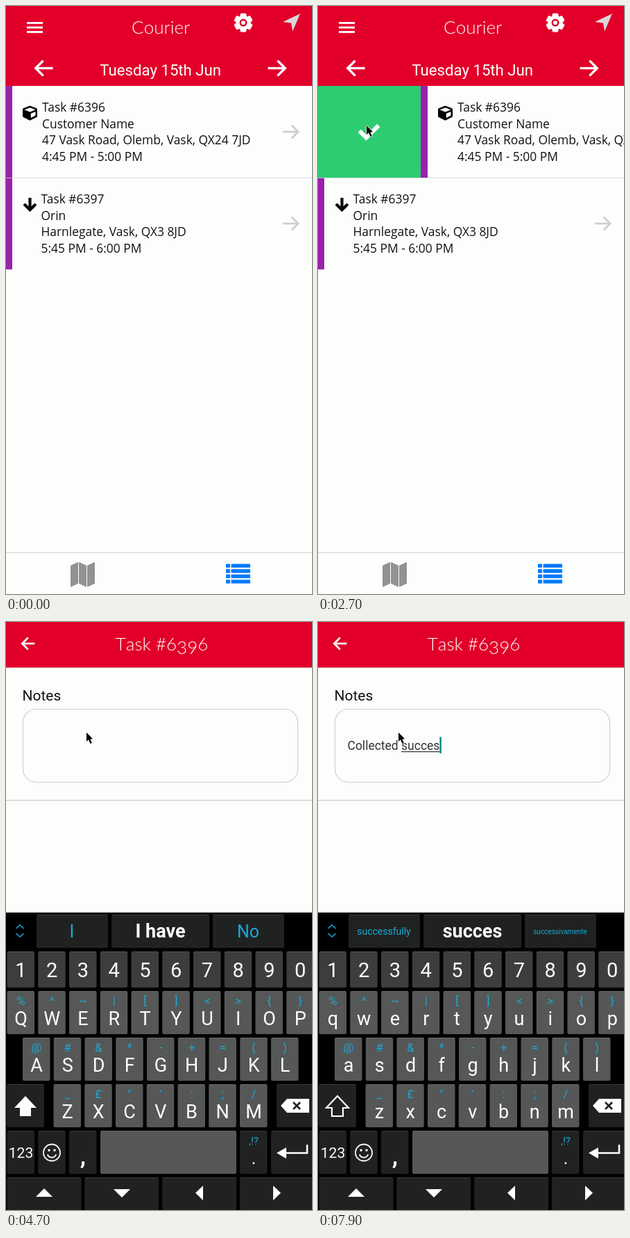
An HTML page with a canvas for the animation above (8000 ms loop, 441 by 846 pixels).

```html
<!DOCTYPE html>
<html lang="en">
<head>
<meta charset="utf-8">
<title>Courier tasks</title>
<style>
html, body { margin: 0; width: 100%; height: 100%; overflow: hidden; background: #fcfefc; }
canvas { display: block; }
</style>
</head>
<body>
<canvas id="stage" width="441" height="846"></canvas>
<script>
const W = 441, H = 846, LOOP = 8000, STEP = 100;
const RED = '#e2002a', PAPER = '#fcfefc', GREEN = '#2ecc71', BLUE = '#0d74d6', HINT = '#1ba8d8';
const ROBOTO = 'Roboto, sans-serif', OPEN = '"Open Sans", sans-serif', LATO = 'Lato, sans-serif';
const stage = document.getElementById('stage').getContext('2d');
const layer = new OffscreenCanvas(W, H).getContext('2d');
let c = stage;

// ---------- drawing helpers ----------
function rect(x, y, w, h, color) {
  c.fillStyle = color;
  c.fillRect(x, y, w, h);
}

function trace(pts) {
  c.beginPath();
  for (let i = 0; i < pts.length; i += 2) c.lineTo(pts[i], pts[i + 1]);
}

function poly(pts, color) {
  trace(pts);
  c.closePath();
  c.fillStyle = color;
  c.fill();
}

function line(pts, color, width) {
  trace(pts);
  c.strokeStyle = color;
  c.lineWidth = width;
  c.stroke();
}

function ring(x, y, r, color, width) {
  c.beginPath();
  c.arc(x, y, r, 0, 7);
  c.strokeStyle = color;
  c.lineWidth = width;
  c.stroke();
}

function disc(x, y, r, color) {
  c.beginPath();
  c.arc(x, y, r, 0, 7);
  c.fillStyle = color;
  c.fill();
}

function text(str, x, y, font, color, align = 'left') {
  c.font = font;
  c.fillStyle = color;
  c.textAlign = align;
  c.fillText(str, x, y);
}

function shifted(x, y, draw) {
  c.save();
  c.translate(x, y);
  draw();
  c.restore();
}

// Arrow centred on x, y; dir 1 points right, -1 left.
function arrow(x, y, half, head, dir, color, width) {
  const tip = x + dir * (half - width * 0.7);
  line([x - dir * half, y, tip, y], color, width);
  line([tip - dir * head, y - head, tip, y, tip - dir * head, y + head], color, width);
}

function check(x, y) {
  line([x - 13.8, y - 2.4, x - 3.9, y + 7.5, x + 13.8, y - 10.2], '#fff', 6);
}

// Titles use hanging figures: 3 and 9 sit below the baseline.
function title(str, y) {
  const font = '300 26px ' + LATO;
  c.font = font;
  let x = 223 - c.measureText(str).width / 2;
  for (const ch of str) {
    text(ch, x, y + ('39'.includes(ch) ? 5 : 0), font, '#fff');
    x += c.measureText(ch).width;
  }
}

// Piecewise linear track of [time, ...values].
function track(keys, t) {
  const n = keys.findIndex(k => k[0] > t);
  if (n < 0) return keys[keys.length - 1].slice(1);
  if (n === 0) return keys[0].slice(1);
  const a = keys[n - 1], b = keys[n], p = (t - a[0]) / (b[0] - a[0]);
  return a.slice(1).map((v, i) => v + (b[i + 1] - v) * p);
}

// ---------- task list ----------
function gear(x, y) {
  shifted(x, y, () => {
    disc(0, 0, 10.5, '#fff');
    for (let i = 0; i < 3; i++) {
      c.beginPath();
      c.roundRect(-4.5, -13.5, 9, 27, 2);
      c.fill();
      c.rotate(Math.PI / 3);
    }
    ring(0, 0, 4.3, RED, 2.4);
  });
}

function cube(x, y) {
  poly([x, y - 10.5, x + 9.8, y - 6.8, x + 10.5, y - 5.5, x + 10.5, y + 5, x + 9.5, y + 6,
    x, y + 10.7, x - 9.5, y + 6, x - 10.5, y + 5, x - 10.5, y - 5.5, x - 9.8, y - 6.8], '#000');
  poly([x, y - 7.8, x + 8, y - 4.8, x, y - 1.5, x - 8, y - 4.8], PAPER);
  poly([x + 1.3, y + 0.8, x + 8, y - 1.9, x + 8, y + 3.6, x + 1.3, y + 7], PAPER);
}

function downArrow(x, y) {
  line([x, y - 10, x, y + 6], '#000', 4.2);
  line([x - 8.4, y - 1, x, y + 7.3, x + 8.4, y - 1], '#000', 4.2);
}

function task(y, x, lines, icon) {
  rect(0, y, W, 132, PAPER);
  rect(-1, y, 10, 132, '#9a20ad');
  icon(34.5, y + 39);
  lines.forEach((s, i) => text(s, x, y + 37 + i * 23.6, '17.4px ' + OPEN, '#111'));
  arrow(411, y + 66, 12, 9.5, 1, '#cccecc', 2.8);
}

function listPage(offset, pressed) {
  rect(0, 0, W, H, PAPER);
  rect(0, 0, W, 115, RED);
  for (let i = 0; i < 3; i++) rect(30, 23 + i * 6.5, 23, 2.8, '#fff');
  title('Courier', 40);
  gear(342, 24);
  poly([424, 11, 413, 36.5, 411, 24.5, 399, 23], '#d9d7d9');
  arrow(54, 89.5, 13.5, 10.8, -1, '#fff', 3.3);
  arrow(391, 89.5, 13.5, 10.8, 1, '#fff', 3.3);
  text('Tuesday 15th Jun', 222.7, 100, '22.2px ' + ROBOTO, '#fff', 'center');

  c.globalAlpha = pressed ? 0.6 : 1;
  rect(0, 115, offset, 132, GREEN);
  if (offset > 58) check(73.5, 182);
  c.globalAlpha = 1;
  shifted(offset, 0, () => task(115, 52,
    ['Task #6396', 'Customer Name', '47 Vask Road, Olemb, Vask, QX24 7JD', '4:45 PM - 5:00 PM'], cube));
  task(247, 50.5, ['Task #6397', 'Orin', 'Harnlegate, Vask, QX3 8JD', '5:45 PM - 6:00 PM'], downArrow);
  rect(0, 247, W, 1, 'rgba(215,215,215,.75)');

  rect(0, 786, W, 1, '#d2d4d2');
  for (let i = 0; i < 3; i++) {
    const x = 93 + i * 12, a = i % 2 ? 800 : 805, b = 1605 - a;
    poly([x, a, x + 11, b, x + 11, b + 31, x, a + 31], '#929292');
  }
  for (let i = 0; i < 4; i++) {
    rect(317, 802.7 + i * 7.6, 6, 5.3, '#007aff');
    rect(324.5, 802.7 + i * 7.6, 27.5, 5.3, '#007aff');
  }
}

// ---------- task form ----------
function signature() {
  c.beginPath();
  c.moveTo(67, 711);
  c.bezierCurveTo(74, 707, 85, 704, 82, 713);
  c.bezierCurveTo(79, 722, 73, 728, 70, 732);
  c.bezierCurveTo(76, 722, 86, 709, 92, 711);
  c.bezierCurveTo(97, 714, 83, 728, 88, 729);
  c.bezierCurveTo(93, 729, 95, 717, 98, 720);
  c.bezierCurveTo(100, 724, 103, 719, 109, 719);
  c.strokeStyle = BLUE;
  c.lineWidth = 3.8;
  c.lineJoin = 'round';
  c.stroke();
  c.lineJoin = 'miter';
}

function camera() {
  c.beginPath();
  c.roundRect(345, 709, 34, 26, 3);
  c.fillStyle = BLUE;
  c.fill();
  poly([353, 710, 356, 704.5, 368, 704.5, 371, 710], BLUE);
  ring(362, 721.5, 7, '#fff', 2.6);
}

function formPage() {
  rect(-1, 0, 1, H, '#e6e8e6');
  rect(0, 0, W, H, PAPER);
  rect(0, 0, W, 65.5, RED);
  rect(0, 65.5, W, 1.5, 'rgba(0,0,0,.08)');
  arrow(31.5, 31, 10, 8.5, -1, '#fff', 2.6);
  title('Task #6396', 40.5);
  text('Notes', 23.5, 112.5, '21px ' + ROBOTO, '#111');
  c.beginPath();
  c.roundRect(24.5, 125.5, 396, 105, 19);
  c.strokeStyle = '#cdcfcd';
  c.lineWidth = 1.2;
  c.stroke();
  rect(0, 256, W, 1.2, '#c9cbc9');
  rect(0, 660, W, 1, '#cdcfcd');
  signature();
  text('Add a proof of delivery', 122, 727, '19.8px ' + OPEN, BLUE);
  camera();
  rect(0, 778, W, 68, GREEN);
  check(179, 813);
  text('Validate', 209, 820.5, '19.8px ' + OPEN, '#fff');
}

// ---------- typing ----------
const NOTE = 'Collected succes';
// time, letters typed, suggestions
const TYPING = [
  [0, 0, 'I', 'I have', 'No'],
  [5300, 1, 'Come', 'C', 'Ciao'],
  [5400, 2, 'Come', 'Co', 'Con'],
  [5500, 3, 'Cold', 'Col', 'Colore'],
  [5600, 4, 'Collaborazione', 'Coll', 'Colloquio'],
  [5800, 5, 'College', 'Colle', 'Collega'],
  [5900, 6, 'Collect', 'Collec', 'Collection'],
  [6000, 7, 'Collection', 'Collected', 'Collect'],
  [6200, 8, 'Collecte', 'Collected', 'Collect'],
  [6600, 9, 'Collect', 'Collected', 'Collector'],
  [6900, 10, 'and', 'from', 'the'],
  [7200, 11, 'so', 's', 'still'],
  [7400, 12, 'sul', 'su', 'such'],
  [7600, 13, 'such', 'suc', 'success'],
  [7700, 14, 'success', 'succ', 'successo'],
  [7800, 15, 'success', 'succe', 'successo'],
  [7900, 16, 'successfully', 'succes', 'successivamente']
];

function note(count, caret) {
  const x = 42.5, typed = NOTE.slice(0, count);
  text(typed, x, 184, '17.5px ' + ROBOTO, '#333');
  const end = x + c.measureText(typed).width;
  const start = x + c.measureText(typed.slice(0, typed.lastIndexOf(' ') + 1)).width;
  rect(start, 186, end - start, 1.2, '#333');
  if (caret) rect(end, 165.5, 2.5, 23.5, '#0c8a80');
}

// ---------- keyboard ----------
const PITCH = 44.75, DARK = '#202221', MID = '#3b3e3d', LIGHT = '#555857';
const ROWS = [
  ['qwertyuiop', '%^~|[]<>{}', 1.5, 531],
  ['asdfghjkl', '@#&*-+=()', 24, 598],
  ['zxcvbnm', '_£"\':;/', 68.5, 665]
];

function key(x, y, w, h, color) {
  c.beginPath();
  c.roundRect(x, y, w, h, 2);
  c.fillStyle = color;
  c.fill();
  rect(x + 1, y, w - 2, 1, 'rgba(255,255,255,.12)');
}

// Shrinks the type until the word fits its box.
function suggestion(str, x) {
  let size = 26;
  do c.font = --size + 'px ' + ROBOTO;
  while (size > 8 && c.measureText(str).width > 80);
  text(str, x, 445 + size * 0.36, c.font, HINT, 'center');
}

function icons(caps) {
  const shift = [28, 682, 44, 699, 36, 699, 36, 711, 20, 711, 20, 699, 12, 699];
  if (caps) poly(shift, '#fff');
  else line(shift.concat([28, 682, 44, 699]), '#fff', 2.2);

  poly([396, 696, 405, 686, 437, 686, 437, 706, 405, 706], '#fff');
  line([414, 691, 424, 701], DARK, 2.6);
  line([424, 691, 414, 701], DARK, 2.6);

  ring(66, 763.5, 12, '#fff', 1.8);
  disc(62, 760, 1.8, '#fff');
  disc(70, 760, 1.8, '#fff');
  c.beginPath();
  c.arc(66, 764, 6.5, 0.3, Math.PI - 0.3);
  c.lineWidth = 1.8;
  c.stroke();

  line([434, 752, 434, 764, 400, 764], '#fff', 2.6);
  poly([390, 764, 404, 756, 404, 772], '#fff');

  poly([43, 827, 55, 815, 67, 827], '#fff');
  poly([155, 816, 179, 816, 167, 828], '#fff');
  poly([284, 811, 284, 832, 273, 821.5], '#fff');
  poly([385, 811, 385, 832, 396, 821.5], '#fff');
}

function keyboard([, count, left, mid, right]) {
  const caps = count === 0;
  rect(0, 418, W, H - 418, '#000');
  line([14.5, 441, 20, 436, 25.5, 441], HINT, 1.6);
  line([14.5, 448, 20, 453, 25.5, 448], HINT, 1.6);
  key(44, 421, 103, 48, DARK);
  key(152, 421, 141, 48, DARK);
  key(298, 421, 103, 48, DARK);
  suggestion(left, 95);
  text(mid, 222.5, 454, 'bold 27px ' + ROBOTO, '#fff', 'center');
  suggestion(right, 349);

  for (let i = 0; i < 10; i++) {
    key(1.5 + i * PITCH, 474, 39.5, 52, MID);
    text((i + 1) % 10, 21.5 + i * PITCH, 511, '29px ' + ROBOTO, '#fff', 'center');
  }
  for (const [letters, hints, x0, y] of ROWS) {
    [...letters].forEach((ch, i) => {
      const x = x0 + i * PITCH;
      key(x, y, 39.5, 62, LIGHT);
      text(hints[i], x + 20, y + 20, '17px ' + ROBOTO, HINT, 'center');
      text(caps ? ch.toUpperCase() : ch, x + 20, y + 49, '27px ' + ROBOTO, '#fff', 'center');
    });
  }
  key(1, 665, 54, 62, DARK);
  key(390, 665, 55, 62, DARK);

  for (let i = 0; i < 3; i++) key(1.5 + i * PITCH, 732, 39.5, 62, DARK);
  key(136, 732, 196, 62, LIGHT);
  key(337, 732, 39.5, 62, DARK);
  key(382, 732, 63, 62, DARK);
  text('123', 21.5, 771, '21px ' + ROBOTO, '#fff', 'center');
  text(',', 111, 780, 'bold 34px ' + ROBOTO, '#fff', 'center');
  text(',!?', 357, 752, '15px ' + ROBOTO, HINT, 'center');
  text('.', 357, 780, '25px ' + ROBOTO, '#fff', 'center');
  for (let i = 0; i < 4; i++) key(1.5 + i * 111.8, 799, 107, 47, DARK);
  icons(caps);
}

// Paints the keyboard apart, so that it fades in as one sheet.
function raiseKeyboard(state, rise) {
  c = layer;
  keyboard(state);
  c = stage;
  c.globalAlpha = 1 - (1 - rise) * 1.25;
  c.drawImage(layer.canvas, 0, Math.round(108 * (1 - rise)));
  c.globalAlpha = 1;
}

// ---------- pointer ----------
const POINTER = [
  [200, 423, 87], [1000, 59, 183], [1200, 56, 184], [1300, 56, 184],
  [1900, 188, 213], [2200, 236, 222], [2700, 70, 172], [2900, 71, 172],
  [3200, 71, 172], [3600, 77, 187], [4000, 115, 158], [4300, 115, 158],
  [4400, 115, 159], [4500, 116, 159]
];
const SWIPE = [[1300, 0], [1900, 78], [2200, 146], [2300, 149]];

function pointer(t) {
  if (t < 200) return;
  const [x, y] = track(POINTER, t);
  shifted(x, y, () => {
    const shape = [0, 0, 0, 13, 3, 10.3, 5.4, 16, 7.8, 15, 5.4, 9.5, 9.2, 9.2];
    line(shape.concat([0, 0]), '#fff', 1.4);
    poly(shape, '#000');
  });
}

// ---------- timeline ----------
function draw(t) {
  const slide = Math.min(1, Math.max(0, (t - 3160) / 450));
  const dx = W * (1 + Math.cos(Math.PI * slide)) / 2;
  const entering = t >= 3300;

  if (!entering) listPage(track(SWIPE, t)[0], t >= 3100);
  else if (dx > 0.1) shifted(-0.3 * (W - dx), 0, () => listPage(149, false));

  if (entering) shifted(dx, Math.min(dx, 0.7), formPage);

  if (t >= 4300) {
    const state = TYPING.filter(s => s[0] <= t).pop();
    note(state[1], t < 4700 || t >= 5200);
    raiseKeyboard(state, 1 - (1 - Math.min(1, (t - 4200) / 300)) ** 2);
  }
  pointer(t);
}

const begin = performance.now();
function frame() {
  const t = (performance.now() - begin) % LOOP;
  draw(Math.floor(t / STEP) * STEP);
  requestAnimationFrame(frame);
}
frame();
</script>
</body>
</html>
```
